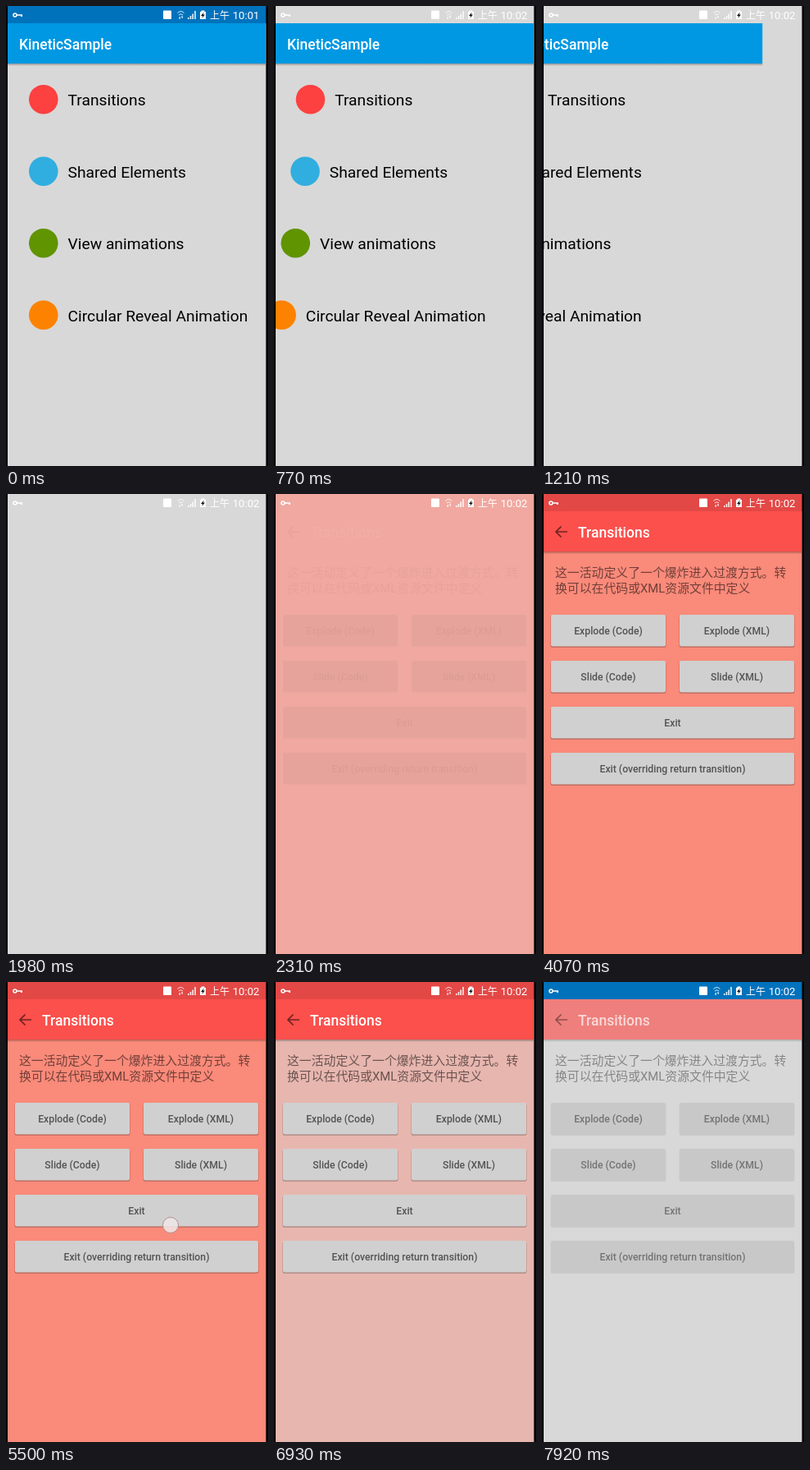
Write an HTML page that moves like this. It is 320 px wide and 560 px high and loops after 8 s.

```html
<!DOCTYPE html>
<html lang="en">
<head>
<meta charset="utf-8">
<title>Activity transitions</title>
<style>
  html, body { margin: 0; width: 100%; height: 100%; overflow: hidden; background: #000; }
  svg { display: block; width: 320px; height: 560px; }
  text { font-family: Roboto, "Noto Sans CJK SC", "Noto Sans CJK", sans-serif; }
  .title { font-size: 17.5px; font-weight: 500; fill: #fff; }
  .row { font-size: 19.25px; }
  .body { font-size: 14.875px; fill-opacity: .54; }
  .label { font-size: 12.25px; font-weight: 500; fill-opacity: .6; text-anchor: middle; }
</style>
</head>
<body>
<svg viewBox="0 0 320 560">
  <defs>
    <linearGradient id="shade" x1="0" y1="0" x2="0" y2="1">
      <stop offset="0" stop-opacity=".32"/>
      <stop offset="1" stop-opacity="0"/>
    </linearGradient>
  </defs>
  <rect id="bg" width="320" height="560"/>
  <rect id="status" width="320" height="21"/>

  <g id="home">
    <g id="homeBar">
      <rect x="2" y="70" width="315" height="3" fill="url(#shade)"/>
      <rect x="2" y="21" width="315" height="49" fill="#0098e2"/>
      <text class="title" x="16" y="52.5">KineticSample</text>
    </g>
  </g>

  <g id="detail">
    <g id="bar">
      <rect x="2" y="70" width="315" height="3" fill="url(#shade)"/>
      <rect x="2" y="21" width="315" height="49" fill="#fb504c"/>
    </g>
    <g id="buttons"></g>
    <g id="words">
      <path d="M31 46H17M23.5 39.5L17 46L23.5 52.5" fill="none" stroke="#000" stroke-opacity=".56" stroke-width="1.7"/>
      <text class="title" x="44" y="52.5">Transitions</text>
      <text class="body" x="16" y="101">这一活动定义了一个爆炸进入过渡方式。转</text>
      <text class="body" x="16" y="119.5">换可以在代码或XML资源文件中定义</text>
    </g>
  </g>

  <circle id="touch" cx="201" cy="296" r="9.5" fill="#f0e8e8" fill-opacity=".85" stroke="#b09090" stroke-width="1"/>

  <g fill="#fff">
    <circle cx="11" cy="11" r="2" fill="none" stroke="#fff" stroke-width="1.6"/>
    <path d="M13 10.2H20V13H18V11.8H13Z"/>
    <rect x="192" y="5.5" width="10" height="10.5" rx="1"/>
    <path d="M209.5 8.5Q213.5 4.5 217.5 8.5M211 11Q213.5 8.5 216 11" fill="none" stroke="#fff" stroke-opacity=".85"/>
    <path d="M211 15.5L212.2 12.5L213.2 15.5ZM214 12.5H216.2L215.1 15.5Z"/>
    <path d="M222 16V14H223.6V16ZM224.7 16V12H226.3V16ZM227.4 16V9.5H229V16ZM230.2 16V6H231.8V16Z" fill-opacity=".9"/>
    <path d="M238.5 5.5H242.5V7H244V16H237V7H238.5Z"/>
    <path d="M241.8 7.5L238 12H240.2L239.2 15L243 10.6H240.8Z" fill="#111"/>
    <text x="249" y="15.5" font-size="12">上午</text>
    <text id="clock" x="309.5" y="15.5" font-size="13.2" text-anchor="end"></text>
  </g>
  <path d="M0 0H2V560H0ZM317.5 0H320V560H317.5Z"/>
</svg>
<script>
const LOOP = 8000, SLIDE = 1100, WIDTH = 317;
const $ = id => document.getElementById(id);

function add(parent, tag, attrs, text) {
  const el = document.createElementNS('http://www.w3.org/2000/svg', tag);
  for (const k in attrs) el.setAttribute(k, attrs[k]);
  if (text) el.textContent = text;
  return parent.appendChild(el);
}

const rows = [
  ['Transitions', '#fd4040'],
  ['Shared Elements', '#30aee0'],
  ['View animations', '#609400'],
  ['Circular Reveal Animation', '#fc8200']
].map(([name, fill], i) => {
  const g = add($('home'), 'g', {}), y = 113.7 + 87.5 * i;
  add(g, 'circle', { cx: 45.8, cy: y, r: 17.8, fill });
  add(g, 'text', { class: 'row', x: 75.5, y: y + 7.6 }, name);
  return { el: g, start: 700 - 101 * i };
});
// Lower views leave first; the toolbar goes last.
const sliders = [{ el: $('homeBar'), start: 784 }, ...rows];

const faces = [], shadows = [];
[
  ['Explode (Code)', 11, 147, 140], ['Explode (XML)', 168, 147, 140],
  ['Slide (Code)', 11, 203, 140], ['Slide (XML)', 168, 203, 140],
  ['Exit', 11, 259, 297], ['Exit (overriding return transition)', 11, 315, 297]
].forEach(([name, x, y, width]) => {
  const box = { x, width, height: 38.5, rx: 2 };
  shadows.push(add($('buttons'), 'rect', { ...box, x: x - .4, width: width + .8, y: y + 1.2, fill: '#000' }));
  faces.push(add($('buttons'), 'rect', { ...box, y }));
  add($('words'), 'text', { class: 'label', x: x + width / 2, y: y + 24 }, name);
});

// Piecewise linear track of [time, ...values].
function track(t, keys) {
  if (t <= keys[0][0]) return keys[0].slice(1);
  for (let i = 1; i < keys.length; i++) {
    const a = keys[i - 1], b = keys[i];
    if (t < b[0]) {
      const p = (t - a[0]) / (b[0] - a[0]);
      return a.slice(1).map((v, k) => v + (b[k + 1] - v) * p);
    }
  }
  return keys[keys.length - 1].slice(1);
}
const rgb = c => `rgb(${c.map(Math.round)})`;

const BG = [[2090, 216, 216, 216], [2310, 240, 168, 160], [2530, 242, 128, 120],
  [2970, 250, 138, 122], [6600, 250, 138, 122], [7190, 216, 216, 216]];
const FACE = [[2310, 229, 163, 155], [2530, 239, 126, 119], [2970, 208, 208, 208],
  [7370, 208, 208, 208], [7920, 200, 200, 200]];
const FACE_ALPHA = [[2110, 0], [2310, 1]];
const BAR = [[2530, 0], [2970, 1], [7370, 1], [7920, .65]];
const WORDS = [[2200, 0], [2310, .06], [2530, .24], [2970, 1], [7370, 1], [7920, .7]];
const SHADOW = [[2530, 0], [2970, .28], [7370, .28], [7920, .08]];

function statusFill(t) {
  if (t < 440 || t >= 7370) return ['#0072bc', 1];
  return ['#e24846', track(t, [[2530, 0], [2970, 1]])[0]];
}

function draw(t) {
  $('bg').setAttribute('fill', rgb(track(t, BG)));
  const [fill, alpha] = statusFill(t);
  $('status').setAttribute('fill', fill);
  $('status').setAttribute('opacity', alpha);
  $('clock').textContent = t < 600 ? '10:01' : '10:02';

  $('home').setAttribute('display', t < 2000 ? 'inline' : 'none');
  for (const { el, start } of sliders) {
    const p = Math.min(1, Math.max(0, (t - start) / SLIDE));
    el.setAttribute('transform', `translate(${-WIDTH * p * p} 0)`);
  }

  $('detail').setAttribute('display', t > 2090 ? 'inline' : 'none');
  $('bar').setAttribute('opacity', track(t, BAR)[0]);
  $('words').setAttribute('opacity', track(t, WORDS)[0]);
  $('buttons').setAttribute('opacity', track(t, FACE_ALPHA)[0]);
  const face = rgb(track(t, FACE)), shadow = track(t, SHADOW)[0];
  faces.forEach(el => el.setAttribute('fill', face));
  shadows.forEach(el => el.setAttribute('opacity', shadow));

  $('touch').setAttribute('display', t >= 5440 && t < 5800 ? 'inline' : 'none');
}

const began = performance.now();
function tick() {
  draw((performance.now() - began) % LOOP);
  requestAnimationFrame(tick);
}
tick();
</script>
</body>
</html>
```
